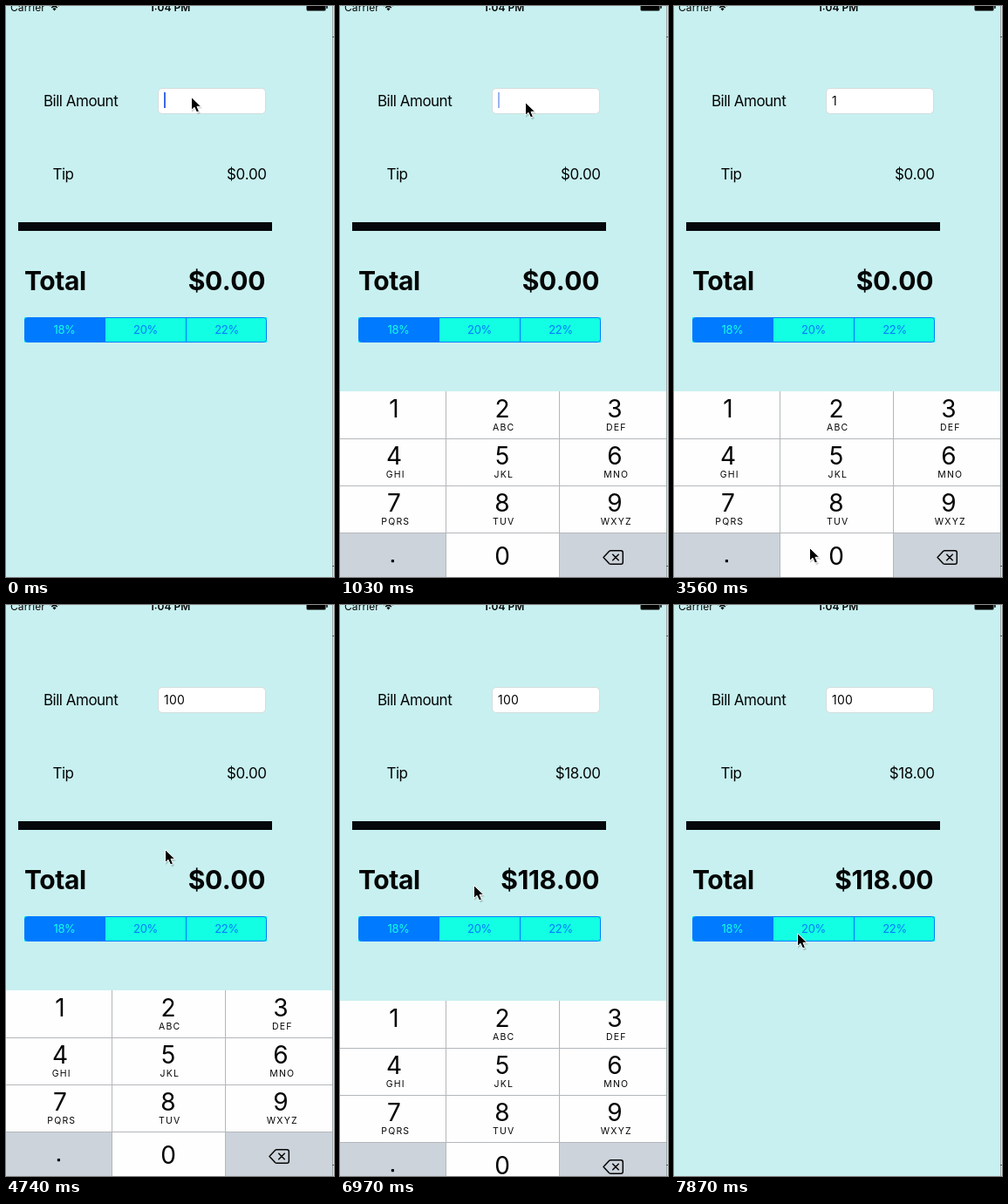
An HTML page for the animation above (8000 ms loop, 376 by 655 pixels).

```html
<!DOCTYPE html>
<html lang="en">
<head>
<meta charset="utf-8">
<title>Tip calculator</title>
<style>
  html, body { margin: 0; width: 100%; height: 100%; overflow: hidden; background: #c8f0f0; }
  svg { display: block; width: 100%; height: 100%; }
  text { font-family: Inter, Roboto, sans-serif; fill: #050505; }
  .label { font-size: 17px; letter-spacing: -.5px; font-kerning: none; }
  .total { font-size: 30px; font-weight: 700; letter-spacing: -.4px; }
  .entry { font-size: 14px; letter-spacing: .2px; }
  .segment { font-size: 13px; letter-spacing: -.3px; text-anchor: middle; fill: #007aff; }
  .digit { font-size: 28px; text-anchor: middle; }
  .letters { font-size: 10.5px; letter-spacing: 1.2px; text-anchor: middle; }
  .end { text-anchor: end; font-kerning: none; }
</style>
</head>
<body>
<svg viewBox="0 0 376 655">
  <rect width="376" height="655" fill="#c8f0f0"/>

  <g id="status">
    <text x="5" y="5.5" font-size="12" letter-spacing=".1">Carrier</text>
    <path d="M50 0Q55.5 -5 61 0M52.2 2Q55.5 -1 58.8 2" fill="none" stroke="#050505" stroke-width="1.6"/>
    <path d="M53.5 3.2Q55.5 1.5 57.5 3.2L55.5 5.5Z"/>
    <text x="188" y="5.5" font-size="12" font-weight="600" text-anchor="middle">1:04 PM</text>
    <rect x="344.5" y="-4" width="22" height="9.5" rx="1.5"/>
    <rect x="367.2" y="-1" width="1.5" height="4" rx=".7"/>
  </g>

  <text class="label" x="43" y="115">Bill Amount</text>
  <rect x="174.5" y="94.5" width="123" height="29" rx="4.5" fill="#fff" stroke="#d3dddd"/>
  <text class="entry" id="entry" x="181" y="114"></text>
  <rect id="caret" y="99" width="2" height="18" fill="#3f68e4"/>

  <text class="label" x="53.5" y="199">Tip</text>
  <text class="label end" id="tip" x="298.5" y="199"></text>
  <rect x="14" y="248" width="291" height="10" fill="#05070b"/>
  <text class="total" x="21" y="326">Total</text>
  <text class="total end" id="total" x="297" y="326"></text>

  <g id="segments">
    <rect x="21" y="357" width="278" height="29" fill="#12ffe3"/>
    <rect x="21.5" y="357.5" width="277" height="28" rx="3" fill="none" stroke="#007aff"/>
    <path d="M114 357.5H24.5a3 3 0 0 0-3 3V382.5a3 3 0 0 0 3 3H114Z" fill="#007aff"/>
    <path d="M206.5 358V385" stroke="#007aff"/>
    <text class="segment" x="67" y="376" style="fill:#12ffe3">18%</text>
    <text class="segment" x="160" y="376">20%</text>
    <text class="segment" x="253" y="376">22%</text>
  </g>

  <g id="keyboard">
    <rect y="442" width="375" height="213" fill="#fefefe"/>
    <path d="M0 604H121V655H0ZM252 604H375V655H252Z" fill="#ccd3db"/>
    <rect id="pressed" x="122" y="605" width="129" height="50" fill="#ccd3db"/>
    <path d="M0 496.5H375M0 550.5H375M0 604.5H375M121.5 442V655M251.5 442V655" stroke="#b4b7ba"/>
    <g id="keys"></g>
    <rect x="58.8" y="635" width="3.2" height="3.2" rx=".8"/>
    <path d="M302 632.5L308.5 625.5Q309.3 624.7 310.5 624.7H322Q324.3 624.7 324.3 627V638Q324.3 640.3 322 640.3H310.5Q309.3 640.3 308.5 639.5ZM312.3 628.7L319.7 636.3M319.7 628.7L312.3 636.3"
      fill="none" stroke="#050505" stroke-width="1.5" stroke-linejoin="round"/>
  </g>

  <path d="M374.5 0V655" stroke="#9aa5a5"/>
  <path d="M375.5 0V655" stroke="#e4e6e6"/>
  <path d="M374 35.5H376M374 642.5H376" stroke="#555"/>

  <g id="pointer">
    <path d="M1 2V18L5 14.5L8 20.5L11 19L8.5 13.5H13Z" opacity=".16"/>
    <path d="M.5 .5V15.5L4 12.3L6.6 18L9.4 16.8L7 11.3H11.7Z" stroke="#fff"/>
  </g>
</svg>
<script>
const LOOP = 8000;
// The screen refreshes in ticks; all moments below are counted in them.
const TICK = 148.3, TICK_LEAD = 15;
const TYPE_ONE = 18, TYPE_ZEROS = 25, RELEASE = 27, DISMISS = 46;
const KEYBOARD_HEIGHT = 213, SLIDE = 5, BLINK = 7;

// Places where the pointer turns or rests: tick, x, y.
const stops = [
  [0, 212, 104], [3, 212, 110], [13, 212, 110],
  [17, 70, 455], [19, 70, 455],
  [23, 155, 621], [28, 155, 621],
  [32, 182, 280], [35, 70, 371], [40, 165, 303],
  [45, 165, 303], [51, 117, 374], [52, 117, 374], [53, 141, 376]
];

const $ = id => document.getElementById(id);
const clamp = v => Math.min(1, Math.max(0, v));
const smooth = p => p * p * (3 - 2 * p);
const smoother = p => p * p * p * (p * (6 * p - 15) + 10);

function pointerAt(tick) {
  const next = stops.findIndex(([start]) => start > tick);
  if (next < 0) return stops.at(-1).slice(1);
  const [t0, x0, y0] = stops[next - 1], [t1, x1, y1] = stops[next];
  const p = smooth((tick - t0) / (t1 - t0));
  return [x0 + (x1 - x0) * p, y0 + (y1 - y0) * p];
}

function keyboardOffset(tick) {
  const shown = smoother(clamp(tick / SLIDE));
  const hidden = smoother(clamp((tick - DISMISS) / SLIDE));
  return KEYBOARD_HEIGHT * (1 - shown + hidden);
}

function caretOpacity(tick) {
  if (tick < BLINK) return 1;
  if (tick > DISMISS) return 0;
  // Typing delays the blink by one tick.
  const phase = (tick - (tick > TYPE_ONE + 4 ? 1 : 0)) % BLINK;
  if (phase === 0) return .5;
  if (phase < 4) return 0;
  return phase === 4 ? .35 : 1;
}

function addText(className, x, y, content) {
  const node = document.createElementNS("http://www.w3.org/2000/svg", "text");
  node.setAttribute("class", className);
  node.setAttribute("x", x);
  node.setAttribute("y", y);
  node.textContent = content;
  $("keys").append(node);
}

const columns = [62, 186, 315];
["", "ABC", "DEF", "GHI", "JKL", "MNO", "PQRS", "TUV", "WXYZ"].forEach((letters, i) => {
  const x = columns[i % 3], y = 442 + 54 * Math.floor(i / 3);
  addText("digit", x, y + 30, i + 1);
  addText("letters", x + 1.8, y + 45, letters);
});
addText("digit", columns[1], 641, 0);

function draw(time) {
  const tick = Math.floor((time + TICK_LEAD) / TICK);
  const entry = "100".slice(0, tick < TYPE_ONE ? 0 : clamp(tick - TYPE_ZEROS + 1) + clamp(tick - TYPE_ZEROS) + 1);
  const bill = tick > DISMISS ? Number(entry) : 0;
  const tip = bill * .18;

  $("entry").textContent = entry;
  $("tip").textContent = "$" + tip.toFixed(2);
  $("total").textContent = "$" + (bill + tip).toFixed(2);
  $("caret").setAttribute("x", 181 + 7.8 * entry.length);
  $("caret").setAttribute("opacity", caretOpacity(tick));
  $("pressed").setAttribute("opacity", tick >= TYPE_ZEROS && tick < RELEASE ? 1 : 0);
  $("keyboard").setAttribute("transform", `translate(0 ${Math.round(keyboardOffset(tick))})`);
  $("pointer").setAttribute("transform", `translate(${pointerAt(tick).map(Math.round)})`);
}

const started = performance.now();
function animate() {
  draw((performance.now() - started) % LOOP);
  requestAnimationFrame(animate);
}
animate();
</script>
</body>
</html>
```
